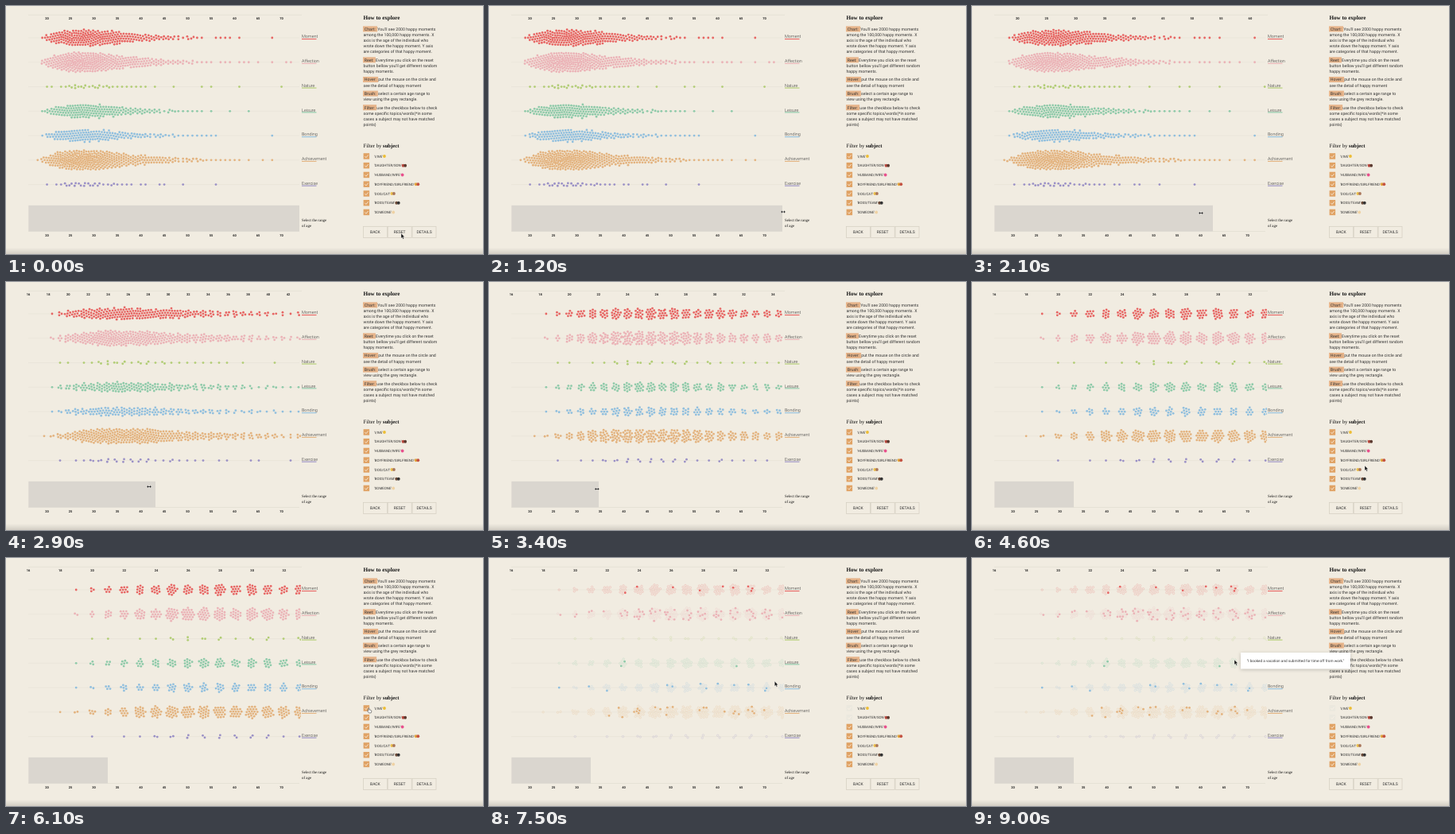
Animation, 600 px wide and 312 px high, one loop 9100 ms. Source, as an HTML page with a canvas:

```html
<!DOCTYPE html>
<html lang="en">
<head>
<meta charset="utf-8">
<title>Happy moments by age</title>
<style>
html, body { margin: 0; width: 100%; height: 100%; overflow: hidden; background: #f1ece1; }
svg, canvas { position: absolute; left: 0; top: 0; width: 600px; height: 312px; }
text { font-family: Roboto, sans-serif; fill: #333; white-space: pre; text-rendering: geometricPrecision; }
.serif { font-family: "Liberation Serif", serif; fill: #111; }
.tick { font-size: 4px; font-weight: 700; fill: #222; text-anchor: middle; }
.mid { text-anchor: middle; }
</style>
</head>
<body>
<svg viewBox="0 0 600 312">
  <defs>
    <linearGradient id="shade" x1="0" y1="0" x2="0" y2="1">
      <stop offset="0" stop-opacity="0"/><stop offset="1" stop-opacity=".13"/>
    </linearGradient>
  </defs>
  <rect y="304" width="600" height="8" fill="url(#shade)"/>
  <path d="M28 11.3H372M28 283.5H369" stroke="#dedacd" stroke-width=".6"/>
  <rect id="brush" x="28.3" y="250.8" height="32.7" fill="#dad6cf"/>
  <g id="ticks"></g>
  <g id="panel"></g>
</svg>
<canvas id="plot"></canvas>
<svg viewBox="0 0 600 312">
  <g id="tip">
    <rect x="338" y="119" width="138" height="20.5" fill="#fff" style="filter:drop-shadow(0 1px 2px #0003)"/>
    <text x="407" y="131" font-size="4.7" class="mid">"I booked a vacation and submitted for time off from work."</text>
  </g>
  <g id="cursor">
    <path id="arrow" d="M0 0V6.2L1.4 5 2.4 7.2 3.5 6.7 2.5 4.6H4.4Z" fill="#111" stroke="#fff" stroke-width=".4"/>
    <path id="resize" d="M-3 0L-1 -1.7V-.5H1V-1.7L3 0 1 1.7V.5H-1V1.7Z" fill="#111" stroke="#fff" stroke-width=".3"/>
    <path id="hand" d="M-1.2 -2.5Q-.5 -3.2 0 -2.4V-.6L2.2 0Q3 .3 2.8 1.4L2.2 3.4H-.6L-2.4 .9Q-2.2 0 -1.2 .7Z" fill="#fff" stroke="#444" stroke-width=".6"/>
  </g>
</svg>
<script>
const LOOP = 9100, STEP = 100, LEFT = 28, SPAN = 341, FULL = 5.9, MIN_AGE = 16, MAX_AGE = 73;
const $ = id => document.getElementById(id);
const canvas = $('plot'), ctx = canvas.getContext('2d'), dpr = window.devicePixelRatio || 1;
canvas.width = 600 * dpr;
canvas.height = 312 * dpr;

// Dots: seeded counts that peak at age 27 with a long tail
let seed = 11;
const rnd = () => (seed = (seed * 1664525 + 1013904223) % 4294967296) / 4294967296;
const ageX = (age, scale) => LEFT + (age - MIN_AGE) * scale;
const share = age => Math.exp(-((Math.log((age - 15) / 12) / .5) ** 2) / 2);

function makeDots(peak, y, scale) {
  const dots = [];
  for (let age = 18; age <= MAX_AGE; age++) {
    let n = Math.floor(peak * share(age) * (.8 + .4 * rnd()) + rnd());
    while (n-- > 0) dots.push({ age, x: ageX(age, scale) + rnd() * 6 - 3, y: y + rnd() * 6 - 3, rank: rnd(), path: [] });
  }
  return dots;
}

// Pull dots to their age and row, push overlapping ones apart
function settle(row, scale, before) {
  const gap = 3.6, pull = .035, dots = row.dots;
  for (const d of dots) d.x += ageX(d.age, scale) - ageX(d.age, before);
  for (let pass = 0; pass < 160; pass++) {
    dots.sort((a, b) => a.x - b.x);
    for (const d of dots) {
      d.x += (ageX(d.age, scale) - d.x) * pull;
      d.y += (row.y - d.y) * pull;
    }
    dots.forEach((a, i) => {
      for (let j = i + 1; j < dots.length && dots[j].x - a.x < gap; j++) {
        const b = dots[j], dx = b.x - a.x, dy = b.y - a.y, dist = Math.hypot(dx, dy) || .01;
        if (dist >= gap) continue;
        const push = (gap - dist) / dist * .4;
        a.x -= dx * push; b.x += dx * push;
        a.y -= dy * push; b.y += dy * push;
      }
    });
  }
  for (const d of dots) d.path.unshift([d.x, d.y]);
}

// [time, pixels per year] of the dots, which trail behind the axis
const zoomKeys = [[0, FULL], [1500, FULL], [2100, 6.3], [2900, 10], [3800, 18.33], [4400, 20.07]];
const widest = zoomKeys[zoomKeys.length - 1][1];
// keep: part of the row that stays solid under the filter
const rows = [
  { name: 'Moment', color: '#e76563', peak: 15, keep: .04 },
  { name: 'Affection', color: '#ebb3b7', peak: 20, keep: .33 },
  { name: 'Nature', color: '#b1cd74', peak: 2, keep: 0 },
  { name: 'Leisure', color: '#8ecaa9', peak: 10.5, keep: .02 },
  { name: 'Bonding', color: '#90bfde', peak: 9.5, keep: .12 },
  { name: 'Achievement', color: '#e3b37f', peak: 20, keep: .12 },
  { name: 'Exercise', color: '#9a90c6', peak: 2, keep: 0 }
];
rows.forEach((row, i) => {
  row.y = 40 + 30.77 * i;
  row.dots = makeDots(row.peak, row.y, widest);
  // Widest first, so that the clusters start out round
  zoomKeys.reduceRight((before, [, scale]) => (settle(row, scale, before), scale), widest);
});

// Static parts
const text = (x, y, s, size, more = '') => `<text x="${x}" y="${y}" font-size="${size}" ${more}>${s}</text>`;
const rect = (x, y, w, h, more) => `<rect x="${x}" y="${y}" width="${w}" height="${h}" ${more}/>`;
const serif = (x, y, s, size, weight = 400) => text(x, y, s, size, `class="serif" font-weight="${weight}"`);
ctx.font = '100px Roboto, sans-serif';
const textWidth = (s, size) => ctx.measureText(s).width * size / 100;
const ticks = (y, lo, hi, step, scale) => {
  let s = '';
  for (let a = Math.ceil(lo / step) * step; a <= hi; a += step)
    s += `<text class="tick" x="${ageX(a, scale)}" y="${y}">${a}</text>`;
  return s;
};

const help = {
  'Chart:': ["You'll see 2000 happy moments", 'among the 100,000 happy moments. X',
    'axis is the age of the individual who', 'wrote down the happy moment. Y axis', 'are categories of that happy moment.'],
  'Reet:': ['Everytime you click on the reset', "button bellow you'll get different random", 'happy moments.'],
  'Hover:': ['put the mouse on the circle and', 'see the detail of happy moment'],
  'Brush:': ['select a certain age range to', 'view using the grey rectangle.'],
  'Filter:': ['use the checkbox below to check', 'some specific topics/words(*in some',
    'cases a subject may not have matched', 'points)']
};
// Subject and its icon colours
const subjects = {
  'I/WE': ['#edbd35'], 'DAUGHTER/SON': ['#b8483e', '#5b3a30'], 'HUSBAND/WIFE': ['#e8518d'],
  'BOYFRIEND/GIRLFRIEND': ['#e0a53c', '#c45342'], 'DOG/CAT': ['#e8bd4b', '#a9755a'],
  'BOSS/TEAM': ['#6b4a38', '#333'], 'SOMEONE': ['#efd2a4']
};

function panel() {
  let s = ticks(290, 20, 70, 5, FULL);
  for (const r of rows)
    s += `<path d="M28 ${r.y}H369" stroke="#e6e1d6" stroke-width=".6"/>`
      + rect(372, r.y + 1, 18.5, 1.1, `fill="${r.color}"`) + text(372, r.y + .3, r.name, 5.5, 'font-weight="300"');
  s += serif(372, 270.8, 'Select the range', 4.9) + serif(372, 278.4, 'of age', 4.9)
    + serif(449.5, 16.7, 'How to explore', 7.1, 700)
    + serif(449.5, 178, 'Filter by <tspan font-weight="700">subject</tspan>', 6.7);
  let y = 30.8;
  for (const [tag, lines] of Object.entries(help)) {
    const w = textWidth(tag, 5.2) + 4.2;
    s += rect(449, y - 5.4, w, 7, 'fill="#e6b48a"') + text(450.8, y, tag, 5.2);
    for (const line of lines) {
      s += text(line === lines[0] ? 449.2 + w : 449.5, y, line, 5.2);
      y += 7.1;
    }
    y += 3.4;
  }
  Object.entries(subjects).forEach(([name, colors], i) => {
    const y = 189 + 11.75 * i, label = `'${name}'`;
    s += rect(449.6, y - 3.8, 7.5, 7.5, 'class="box"')
      + `<path d="M451.3 ${y}l1.6 1.7 2.8 -3.3" fill="none" stroke="#fbf3e6" stroke-width=".8"/>`
      + text(463, y + 1.6, label, 4.4);
    colors.forEach((c, k) => {
      s += `<circle cx="${465 + textWidth(label, 4.4) + 2.6 * k}" cy="${y}" r="1.9" fill="${c}"/>`;
    });
  });
  ['BACK', 'RESET', 'DETAILS'].forEach((label, i) => {
    s += rect(449.4 + 30.8 * i, 277.3, 30, 14.2, 'fill="none" stroke="#d3cec1" stroke-width=".7"')
      + text(464.4 + 30.8 * i, 286.2, label, 5, 'class="mid"');
  });
  return s;
}
$('panel').innerHTML = panel();
const boxes = document.querySelectorAll('.box');

// Motion keys are [time, value, ...]
function at(keys, t) {
  const i = keys.findIndex(k => k[0] > t);
  if (i < 1) return (i ? keys[keys.length - 1] : keys[0]).slice(1);
  const a = keys[i - 1], b = keys[i], f = (t - a[0]) / (b[0] - a[0]);
  return a.slice(1).map((v, k) => v + (b[k + 1] - v) * f);
}
const brushKeys = [[1300, 369], [2100, 303], [2900, 188], [3500, 128]];
const layoutKeys = zoomKeys.map(([t], i) => [t, i]);
const cursorKeys = [[0, 497, 286], [1000, 370, 259], [1300, 370, 259], [2100, 288, 260.5], [2900, 180, 257.5],
  [3500, 127, 261], [3800, 127, 261], [4000, 530, 240], [5000, 470, 225], [5300, 578, 268], [6000, 457, 191.5],
  [6600, 457, 191.5], [6800, 456, 202.5], [7100, 456, 202.5], [8200, 190, 72], [9000, 330, 128]];
const clicks = [6400, 6900];

function drawDots(t, clicked) {
  const [pos] = at(layoutKeys, t), i = Math.floor(pos), f = pos - i;
  ctx.setTransform(dpr, 0, 0, dpr, 0, 0);
  ctx.clearRect(0, 0, 600, 312);
  ctx.save();
  ctx.beginPath();
  ctx.rect(0, 0, 371, 312);
  ctx.clip();
  ctx.lineWidth = .5;
  for (const row of rows) {
    const kept = [1, row.keep * 1.6, row.keep][clicked];
    ctx.fillStyle = ctx.strokeStyle = row.color;
    for (const d of row.dots) {
      const a = d.path[i], b = d.path[i + 1] || a, solid = d.rank < kept;
      ctx.beginPath();
      ctx.arc(a[0] + (b[0] - a[0]) * f, a[1] + (b[1] - a[1]) * f, solid ? 1.4 : 1.25, 0, 7);
      ctx.globalAlpha = solid ? 1 : .4;
      solid ? ctx.fill() : ctx.stroke();
    }
  }
  ctx.restore();
}

function draw(t) {
  const [edge] = at(brushKeys, t), range = (edge - LEFT) / FULL;
  const clicked = clicks.filter(c => t >= c).length;
  $('brush').setAttribute('width', edge - 28.3);
  $('ticks').innerHTML = ticks(16.8, MIN_AGE, MIN_AGE + range, range < 31.6 ? 2 : 5, SPAN / range);
  drawDots(t, clicked);
  boxes.forEach((b, i) => b.setAttribute('fill', i < clicked ? '#ebe8de' : '#e0a264'));
  const kind = t >= 1000 && t <= 3800 ? 'resize' : t >= 5900 && t <= 7100 ? 'hand' : 'arrow';
  for (const id of ['arrow', 'resize', 'hand']) $(id).style.display = id === kind ? '' : 'none';
  $('cursor').setAttribute('transform', `translate(${at(cursorKeys, t)})`);
  $('tip').style.display = t >= 8800 ? '' : 'none';
}

const start = performance.now();
function tick() {
  const t = (performance.now() - start) % LOOP;
  draw(Math.floor(t / STEP) * STEP);
  requestAnimationFrame(tick);
}
tick();
</script>
</body>
</html>
```
